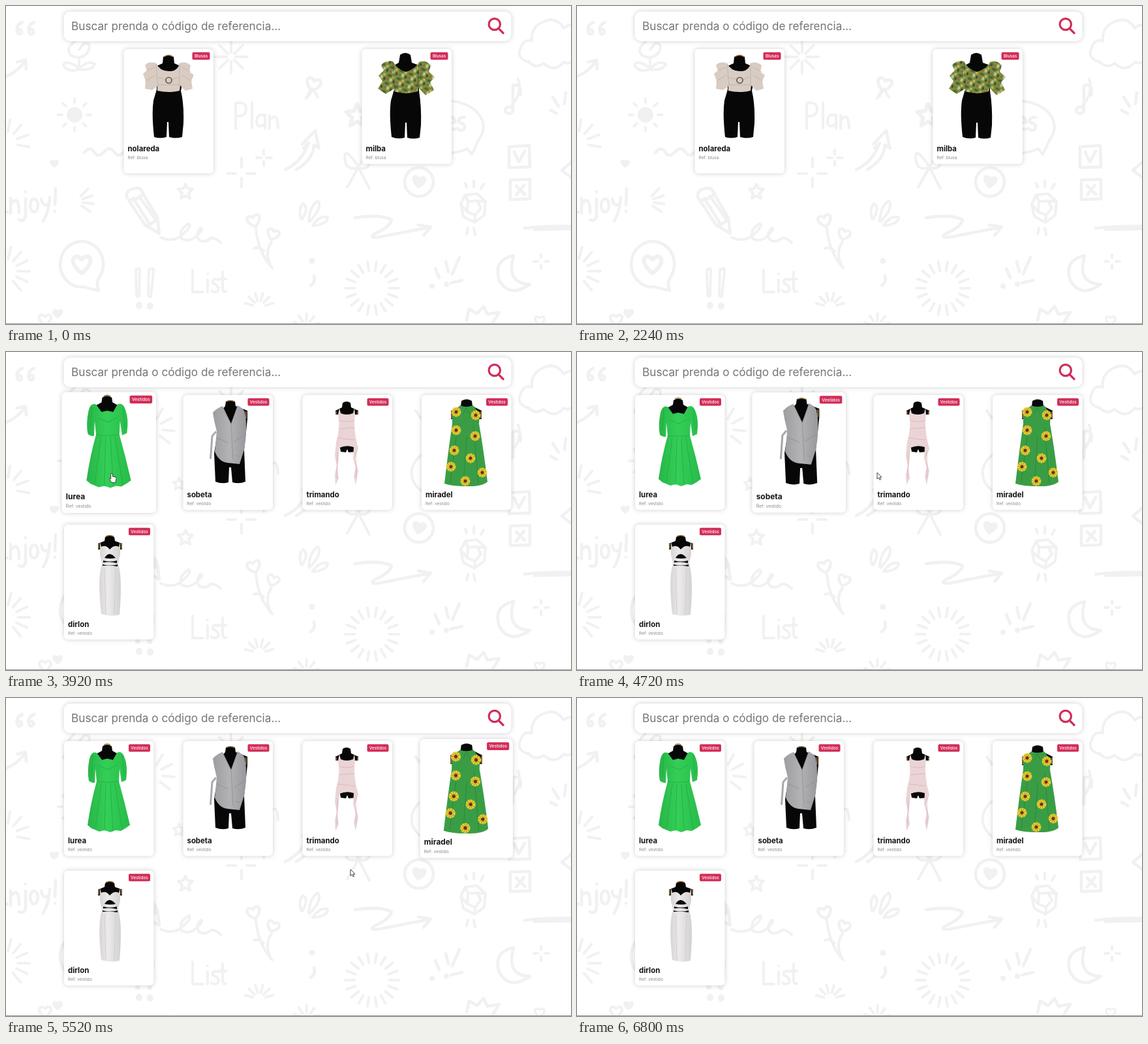
An HTML page for the animation above (6.88 s loop, 866 by 488 pixels).

```html
<!DOCTYPE html>
<html lang="es">
<head>
<meta charset="utf-8">
<title>Buscador de prendas</title>
<style>
html, body { margin: 0; width: 100%; height: 100%; overflow: hidden; background: #fff; }
svg { display: block; width: 866px; height: 488px; font-family: Poppins, Inter, sans-serif; }
.doodles { fill: none; stroke: #f1f1f1; stroke-width: 4.6; stroke-linecap: round; stroke-linejoin: round; }
.doodles .thin { stroke-width: 4; }
.doodles .solid { fill: #f1f1f1; stroke-width: 2; }
.panel { fill: #fff; filter: drop-shadow(0 0 3.5px rgba(0, 0, 0, .2)); }
.hint { font-size: 17.2px; fill: #757575; }
.name { font-size: 11.4px; font-weight: 700; fill: #151515; }
.ref { font-size: 6.6px; fill: #8a8a8a; }
.tag { fill: #d32d59; }
.tagText { font-size: 6.4px; font-weight: 500; fill: #fff; text-anchor: middle; }
.body { fill: #070708; }
.trim { fill: none; stroke: #a17c45; stroke-width: 1.5; }
.fold { fill: none; stroke-width: 1; stroke-linecap: round; stroke-opacity: .6; }

.card { transform-box: fill-box; transform-origin: center; }
.card, .move, .set, .photos, .arrow, .hand { animation: 6.88s linear infinite; }
.set, .photos, .arrow, .hand { animation-timing-function: step-end; }
.first { animation-name: first; }
.second { animation-name: second; }
.second .photos { animation-name: photos; }
.green { animation-name: hover1; }
.grey { animation-name: hover2; }
.pink { animation-name: hover3; }
.sunny { animation-name: hover4; }
.white { animation-name: hover5; }
.card { animation-timing-function: ease; }
.move { animation-name: move; }
.arrow { animation-name: arrow; }
.hand { animation-name: hand; }

@keyframes first { 0% { visibility: visible } 39.53%, 100% { visibility: hidden } }
@keyframes second { 0% { visibility: hidden } 39.53%, 100% { visibility: visible } }
@keyframes photos { 0% { visibility: hidden } 46.51%, 100% { visibility: visible } }
@keyframes hover1 { 0%, 52.33%, 62.21%, 100% { transform: scale(1) } 55.23%, 59.3% { transform: scale(1.05) } }
@keyframes hover2 { 0%, 61.34%, 71.22%, 100% { transform: scale(1) } 64.24%, 68.31% { transform: scale(1.05) } }
@keyframes hover3 { 0%, 68.6%, 75.29%, 100% { transform: scale(1) } 71.22%, 72.38% { transform: scale(1.05) } }
@keyframes hover4 { 0%, 73.55%, 82.55%, 100% { transform: scale(1) } 76.45%, 79.65% { transform: scale(1.05) } }
@keyframes hover5 { 0%, 82.85%, 93.02%, 100% { transform: scale(1) } 85.76%, 90.12% { transform: scale(1.05) } }
@keyframes arrow {
  0%, 52.33%, 61.63%, 69.77%, 73.26%, 82.56%, 93.02%, 100% { visibility: hidden }
  50%, 60.47%, 67.44%, 72.09%, 79.07%, 90.7% { visibility: visible }
}
@keyframes hand {
  0%, 60.47%, 67.44%, 72.09%, 79.07%, 90.7%, 100% { visibility: hidden }
  52.33%, 61.63%, 69.77%, 73.26%, 82.56% { visibility: visible }
}
@keyframes move {
  0%, 50% { transform: translate(290px, 350px) }
  52.33% { transform: translate(205px, 225px) }
  56.9%, 58.1% { transform: translate(162px, 186px) }
  59.3% { transform: translate(175px, 188px) }
  61.05% { transform: translate(250px, 190px) }
  63.95% { transform: translate(340px, 186px) }
  66.28% { transform: translate(365px, 186px) }
  68.5%, 69.7% { transform: translate(460px, 185px) }
  70.93% { transform: translate(525px, 180px) }
  73.26% { transform: translate(640px, 172px) }
  76.74% { transform: translate(712px, 165px) }
  79.07% { transform: translate(625px, 220px) }
  80.2%, 81.3% { transform: translate(528px, 263px) }
  82.56% { transform: translate(222px, 310px) }
  84.3% { transform: translate(165px, 345px) }
  88.37% { transform: translate(160px, 352px) }
  90.7% { transform: translate(158px, 444px) }
  93.02%, 100% { transform: translate(156px, 470px) }
}
</style>
</head>
<body>
<svg viewBox="0 0 866 488">
<defs>
  <path id="heart" d="M0 8C-16 -3 -7 -13 0 -5C7 -13 16 -3 0 8Z"/>
  <path id="star" d="M0 -11L3 -4 11 -3 5 3 7 11 0 7 -7 11 -5 3 -11 -3 -3 -4Z"/>
  <pattern id="leaves" width="15" height="13" patternUnits="userSpaceOnUse" patternTransform="rotate(20)">
    <rect width="15" height="13" fill="#7d8a42"/>
    <ellipse cx="4" cy="3" rx="3.5" ry="2" fill="#3f6b33"/>
    <circle cx="11" cy="4" r="2" fill="#d9b04c"/>
    <ellipse cx="8" cy="9" rx="2" ry="3" fill="#b9c78a"/>
    <circle cx="3" cy="10" r="1.6" fill="#a8583a"/>
    <ellipse cx="13" cy="10" rx="1.5" ry="2.5" fill="#2f4a2c"/>
  </pattern>
  <linearGradient id="grass"><stop offset="0" stop-color="#27b548"/><stop offset=".45" stop-color="#33cf57"/><stop offset="1" stop-color="#28bb4a"/></linearGradient>
  <linearGradient id="ash"><stop offset="0" stop-color="#9d9da0"/><stop offset=".5" stop-color="#b3b2b5"/><stop offset="1" stop-color="#98979b"/></linearGradient>
  <linearGradient id="pearl"><stop offset="0" stop-color="#d6d4d5"/><stop offset=".4" stop-color="#eceaeb"/><stop offset="1" stop-color="#d2d0d1"/></linearGradient>

  <g id="cream">
    <path class="body" d="M241 78Q249 73 257 78L258 88 272 94V112L268 130Q273 150 272 180L270 201Q260 204 250 201L249 178H247L246 201Q236 204 227 201Q223 165 226 145L231 128V92L240 88Z"/>
    <path class="trim" d="M242 78Q249 73 256 78"/>
    <path fill="#d8ccc3" d="M230 88Q219 84 213 91L216 99 210 104 214 115 213 127 224 129 232 123V130Q250 134 266 130L267 122 275 130 286 127 284 115 288 106 281 101 283 91Q274 84 266 88Q263 101 249 100Q236 100 230 88Z"/>
    <path class="fold" stroke="#b5a69c" d="M230 88L233 122M266 88L266 122M216 99L228 94M214 115L229 106M283 101L270 94M284 115L270 106M234 110L245 113M265 109L254 113M233 121H266"/>
    <circle cx="249.500" cy="114" r="4.500" fill="none" stroke="#66594a" stroke-width="1.700"/>
  </g>
  <g id="print">
    <path class="body" d="M604 75Q612 69 620 75L622 87 633 91V130Q637 155 636 183L634 202Q624 205 615 202L614 179H612L611 202Q601 205 591 201Q587 165 590 145L595 128V91L602 87Z"/>
    <path fill="url(#leaves)" d="M593 85Q582 82 575 91L579 99 571 107 577 115 570 127 582 135 595 127V131Q613 137 631 131L632 125 643 137 656 129 650 117 657 109 648 101 651 91Q643 82 633 86Q627 97 613 101Q599 97 593 85Z"/>
    <path class="fold" stroke="#3d4b27" d="M593 86L596 127M633 87L631 125M579 99L591 94M577 115L592 105M648 101L636 94M650 117L635 106"/>
  </g>
  <g id="green">
    <path class="body" d="M148 74Q155 69 162 74L163 81 172 86 166 99H145L138 86 147 81Z"/>
    <path class="trim" d="M150 72Q155 69 160 72"/>
    <path fill="url(#grass)" d="M139 84Q131 81 128 93Q124 112 127 127Q131 131 136 130L137 108 139 128Q130 160 125 195L131 200 136 202 143 205 151 203 160 206 168 203 176 204 183 200 190 195Q182 160 173 128L174 108 177 129 184 126Q187 105 182 92Q178 80 170 84L164 95 155 93 147 95Z"/>
    <path class="fold" stroke="#1da23c" d="M139 128Q157 131 173 128M146 132L137 200M153 132L151 203M160 132L164 203M167 132L178 201M142 104L156 110M170 103L156 110M133 88L131 120M178 88L181 119"/>
  </g>
  <g id="grey">
    <path class="body" d="M337 76Q344 72 351 76L352 83 370 90V103L365 150 367 199Q357 203 347 200L345 177H342L341 200Q331 203 321 199L319 155 330 90 336 83Z"/>
    <path class="trim" d="M338 76Q344 73 350 76M368 91V102"/>
    <path d="M322 122L316 129 313.500 164" fill="none" stroke="#a9a8ac" stroke-width="3"/>
    <path fill="url(#ash)" d="M332 83Q323 86 317 93L319 105 323 122 320 153Q326 168 339 170L358 172 365 150Q371 118 366 92Q363 86 355 82L345 110Z"/>
    <path class="fold" stroke="#85858a" d="M332 84L345 111 355 83M345 111L348 165M323 132L340 139M365 128L350 137M352 159L357 160"/>
  </g>
  <g id="pink">
    <path class="body" d="M516 78Q522 74 528 78L529 85 540 90V96H505V90L515 85ZM511 142H537V153L525 154 523 149 521 154 513 153Z"/>
    <path class="trim" d="M506 91V96M539 91V96"/>
    <path fill="#ead4d6" d="M511 86L513 94Q522 98 532 94L534 86 535 95Q532 113 537 136L540 148 535 164 540 182 536 204 533 191 536 177 532 163 533 146Q522 142 511 147L510 162 508 180 510 194 505 204 504 188 507 174 504 160 506 138Q513 115 509 96Z"/>
    <path class="fold" stroke="#cfa8b0" d="M511 105Q523 109 533 105M511 118L534 116M509 132L534 135M508 154L507 194M536 153L537 194"/>
  </g>
  <g id="sunny">
    <path class="body" d="M698 75Q706 70 714 75L715 83 729 90V103H682V90L697 83Z"/>
    <path class="trim" d="M683 91V102M728 91V102"/>
    <path fill="#3a9d45" d="M696 82Q705 86 716 82L726 95 725 110Q732 150 738 199Q730 207 705 206Q683 206 672 202Q678 150 684 110L684 95Z"/>
    <path class="fold" stroke="#237a31" d="M705 86L701 95M706 86L711 96M692 115L681 200M706 130L701 204M717 116L724 202"/>
    <g id="blooms" fill="#5b3719" stroke="#ecc92f" stroke-width="4.800" stroke-dasharray="2.800 .4"/>
  </g>
  <g id="white">
    <path class="body" d="M152 284Q159 279 166 284L167 290 178 294V303H141V294L151 290ZM150 303H169L172 331H147Z"/>
    <path class="trim" d="M142 293V302M177 293V302M153 283Q159 280 165 283"/>
    <path fill="url(#pearl)" fill-rule="evenodd" d="M144 291L146 299Q153 295 159 303Q166 295 173 299L175 291 175 311 172 324 174 334Q178 356 174 403Q161 407 146 402Q141 355 145 334L147 324 144 311ZM151 316Q158 304 168 316Q160 318 151 316ZM149 320Q160 323 170 320V324Q160 321 149 323ZM148 326Q160 329 171 326V329Q160 327 148 328Z"/>
    <path class="fold" stroke="#c5c3c5" d="M151 333L153 402M168 333L166 402"/>
  </g>
</defs>

<g class="doodles">
  <path id="rays" class="thin"/>
  <path d="M25 25Q15 29 17 39Q19 46 24 41Q25 35 18 36M43 25Q33 29 35 39Q37 46 42 41Q43 35 36 36"/>
  <path d="M-2 109Q18 101 29 85M17 86L30 83 31 97"/>
  <path d="M105 55Q90 66 100 76Q116 84 126 70Q132 55 119 58L112 67M112 80V97M112 95Q91 81 88 91Q95 103 112 97Q125 82 136 89Q132 100 112 97" class="thin"/>
  <circle cx="105" cy="167" r="11" class="solid"/>
  <path d="M120 225Q129 214 135 224T150 224T166 224T181 223"/>
  <path d="M-6 317L2 316M7 318V295M7 304Q20 288 20 317M30 296V322Q28 332 20 328M30 285v.1M54 296Q56 309 65 304M67 294Q65 318 57 330M76 280L75 305M75 315v.1"/>
  <ellipse cx="43" cy="306" rx="6" ry="10"/>
  <path d="M185 293Q184 281 198 280Q207 278 209 286L232 325 235 349 213 336ZM188 298Q201 298 211 288M195 295L219 333M204 292L228 326M214 337Q224 336 232 326"/>
  <path d="M237 355Q254 363 268 353Q287 337 280 334Q264 343 269 357Q282 364 294 351Q304 341 298 341Q289 352 297 360Q307 363 314 356Q321 355 329 363" class="thin"/>
  <path d="M141 436Q127 434 120 431A33 35 0 1 1 144 415Q137 423 142 437Z"/>
  <path d="M199 405Q206 400 205 407L204 445Q200 447 200 443ZM219 405Q227 400 226 407L222 446Q218 447 218 443Z" class="thin"/>
  <path d="M204 459v1M221 460v1" stroke-width="10"/>
  <path d="M286 405V439H302M309 420V439M309 411v.1M326 420Q316 417 317 425Q328 430 325 437Q320 441 315 437M332 408V434Q333 440 337 438M327 419H337" class="thin"/>
  <path d="M352 188V149Q368 146 368 158T353 169M377 148V187M397 168Q384 164 384 178Q386 190 397 180M397 167V188M404 188V168M404 176Q416 160 417 187" class="thin"/>
  <path d="M383 341Q386 377 408 402M407 362Q396 377 405 397M395 376Q386 369 380 372" class="thin"/>
  <path d="M452 326Q448 311 455 303Q465 309 454 327ZM464 329Q466 306 478 299Q486 309 465 331ZM470 336Q481 321 493 324Q493 335 471 337Z" class="thin"/>
  <path d="M361 233V247M361 264V278M339 257H352M369 257H382M395 221V228M395 238V245M384 233H391M399 233H407" class="thin"/>
  <path d="M428 251Q453 240 464 210L456 218M445 251Q471 236 472 213L480 218M454 212L474 191 479 216"/>
  <path d="M464 138L470 127 478 140M467 128L460 142" class="thin"/>
  <path d="M540 246Q515 210 520 239Q523 253 540 248Q558 212 559 237Q556 253 540 248L523 278M541 249L557 280" class="thin"/>
  <circle cx="633" cy="270" r="22"/>
  <path d="M535 325Q575 319 591 328Q589 339 564 350Q555 357 575 354Q615 346 648 340M632 336L651 339 640 352"/>
  <path d="M469 391v.1" stroke-width="9"/><path d="M472 414Q475 424 467 429"/>
  <path d="M658 403L664 417M674 392L678 408M695 386L684 411M682 425L699 421"/><path d="M653 430v.1M675 427v.1" stroke-width="8"/>
  <path d="M778 383Q746 390 756 421Q772 449 803 427Q766 426 778 383Z"/>
  <path d="M820 381V386M820 397V403M809 392H815M826 392H832" class="thin"/>
  <path d="M704 290L722 288 735 300 733 321 718 332 701 323 697 304ZM708 300L722 299 728 310 719 321 707 316ZM704 290L708 300M735 300L722 299M718 332L719 321M697 304L707 316M708 341L706 350M717 341L719 351M706 278L704 272M717 278V268M728 280L732 273" class="thin"/>
  <path d="M771 216L802 214 803 247 771 248ZM779 224L786 239 795 223M773 267L803 266V296L773 297ZM782 276L795 289M794 275L782 290"/>
  <path d="M777 160V122Q792 118 788 137"/><ellipse cx="771" cy="160" rx="6" ry="5"/>
  <path d="M707 219A55 40 0 1 1 724 206L714 228Z" class="thin"/>
  <path d="M648 168L655 179 664 167M655 179V194M675 181L689 178Q684 165 676 174Q671 190 688 189M703 171Q691 170 695 179Q706 181 702 189Q697 193 692 188"/>
  <path d="M801 86Q781 80 789 64Q793 50 806 54Q804 32 824 24Q843 15 855 34Q862 27 870 31M801 85Q810 97 824 88Q841 103 855 86Q862 90 870 84" class="thin"/>
  <path d="M795 341Q831 337 870 338M810 343L866 342"/>
  <path d="M835 160L844 165M838 140L847 154M858 133L856 150M866 240L852 252 866 263"/>
  <path d="M706 482L710 465 722 472 732 461 738 473 756 470 746 486"/>
  <path d="M628 90L637 103M785 112Q792 132 775 153" class="thin"/>
  <g class="thin">
    <use href="#heart" transform="translate(74 242) scale(.7)" class="solid"/>
    <use href="#heart" transform="translate(116 397) scale(1.5 1.6)"/>
    <use href="#heart" transform="translate(380 330) rotate(-15) scale(1.100)"/>
    <use href="#heart" transform="translate(409 351) rotate(20)"/>
    <use href="#heart" transform="translate(471 121) rotate(15) scale(1.200)"/>
    <use href="#heart" transform="translate(633 270) rotate(10) scale(1.100)" class="solid"/>
    <use href="#heart" transform="translate(60 482)"/>
    <use href="#heart" transform="translate(79 472) scale(.8)" class="solid"/>
    <use href="#heart" transform="translate(818 483) scale(.8)"/>
    <use href="#star" transform="translate(275 284)"/>
    <use href="#star" transform="translate(265 202) scale(.8)"/>
    <use href="#star" transform="translate(538 167) scale(1.500)"/>
  </g>
</g>

<rect class="panel" x="88.500" y="8.500" width="686" height="45.500" rx="10"/>
<text class="hint" x="100" y="37">Buscar prenda o código de referencia...</text>
<g fill="none" stroke="#d02e58" stroke-width="3.200" stroke-linecap="round">
  <circle cx="748.800" cy="28" r="8.700"/><path d="M755 34.500L762 41.500"/>
</g>

<g class="set first" id="first"></g>
<g class="set second" id="second"></g>
<path d="M0 487.500H866" stroke="#999"/>

<g class="move" fill="#fff" stroke="#333" stroke-width=".9" stroke-linejoin="round">
  <path class="arrow" d="M0 0V10L2.400 7.800 4 11.300 5.600 10.600 4 7.200H7Z"/>
  <path class="hand" d="M-1.300 1Q0 -.6 1.300 1V5L6 6Q7.500 7 7 9L5.500 14.500H0L-3.500 9Q-3.500 7.200 -1.300 8.700Z"/>
</g>
</svg>
<script>
const get = id => document.getElementById(id);

function rays(x, y, inner, outer, count, from = 0, to = 360) {
  let d = '';
  for (let i = 0; i < count; i++) {
    const a = (from + (to - from) * i / count) * Math.PI / 180;
    d += `M${x + inner * Math.cos(a)} ${y + inner * Math.sin(a)}L${x + outer * Math.cos(a)} ${y + outer * Math.sin(a)}`;
  }
  return d;
}
get('rays').setAttribute('d', [
  rays(105, 167, 19, 25, 8),
  rays(561, 433, 27, 41, 18),
  rays(345, 78, 7, 25, 8),
  rays(0, 210, 18, 36, 4, -80, 40),
  rays(-2, 407, 20, 38, 6, -75, 75),
  rays(106, 300, 12, 28, 4, -45, 60),
  rays(388, 462, 10, 22, 6, -165, 15),
  rays(460, 492, 10, 20, 5, -160, 20),
  rays(222, 118, 18, 36, 4, -60, 70)
].join(''));

const spots = [[690, 92], [690, 120], [719, 129], [712, 163], [687, 151], [682, 176], [730, 185], [704, 198], [720, 97]];
get('blooms').innerHTML = spots.map(([x, y]) => `<circle cx="${x}" cy="${y}" r="5"/>`).join('');

function card(x, y, h, kind, name, art) {
  const w = kind.length > 6 ? 33 : 27;
  return `<g class="card ${art}">
    <rect class="panel" x="${x}" y="${y}" width="137.500" height="${h}" rx="6"/>
    <use class="photos" href="#${art}"/>
    <rect class="tag" x="${x + 132 - w}" y="${y + 5}" width="${w}" height="11.500" rx="2"/>
    <text class="tagText" x="${x + 132 - w / 2}" y="${y + 13.1}">${kind}</text>
    <text class="name" x="${x + 6}" y="${y + 157}">${name}</text>
    <text class="ref" x="${x + 6}" y="${y + 169}">Ref: ${kind.slice(0, -1).toLowerCase()}</text>
  </g>`;
}
get('first').innerHTML =
  card(180.5, 66, 191, 'Blusas', 'nolareda', 'cream') +
  card(545.5, 66, 176.5, 'Blusas', 'milba', 'print');
get('second').innerHTML = [
  [89, 66, 'lurea', 'green'],
  [271.5, 66, 'sobeta', 'grey'],
  [454.5, 66, 'trimando', 'pink'],
  [637, 66, 'miradel', 'sunny'],
  [89, 264.8, 'dirlon', 'white']
].map(([x, y, name, art]) => card(x, y, 176.5, 'Vestidos', name, art)).join('');
</script>
</body>
</html>
```
